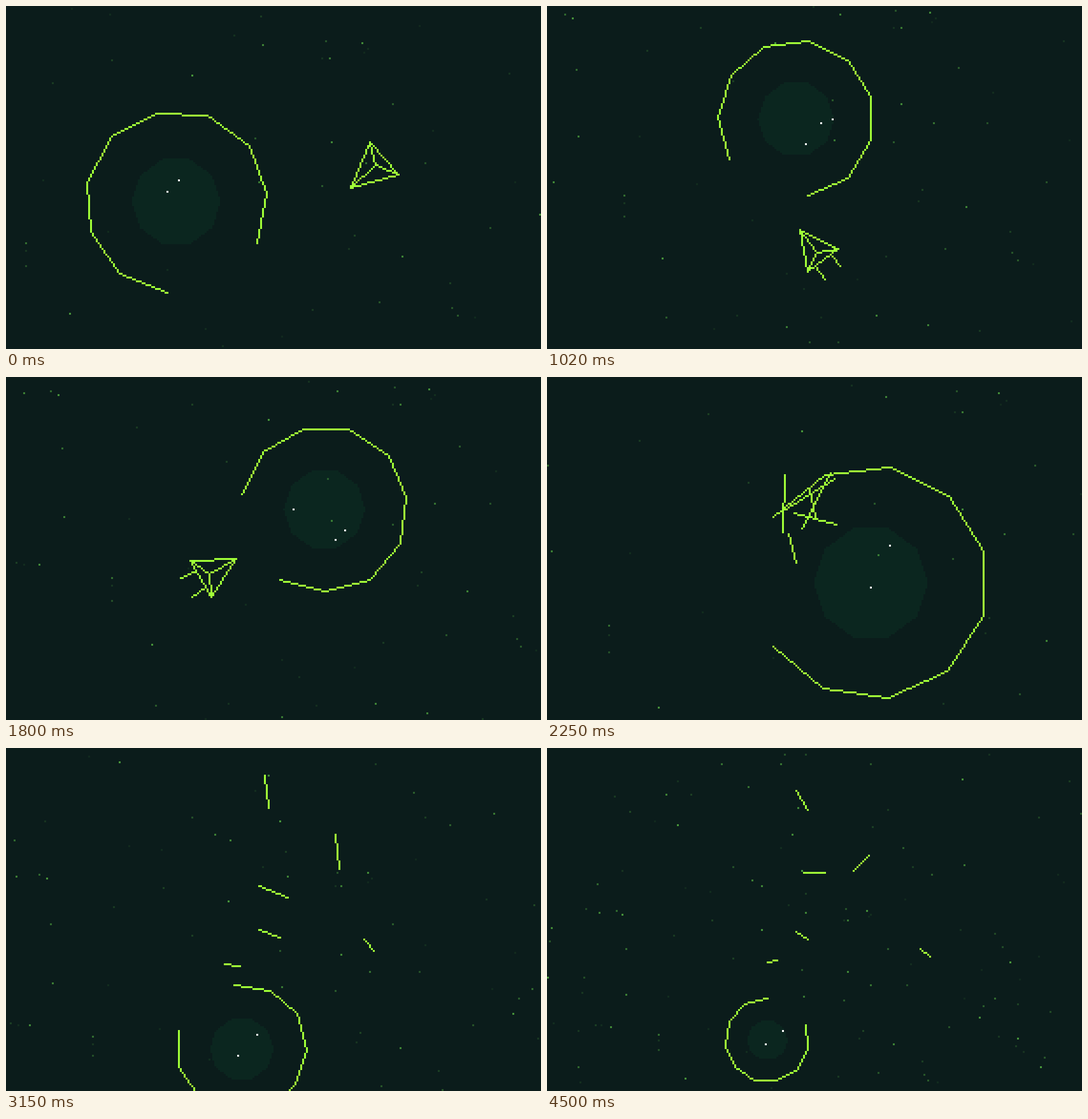
An HTML page with a canvas that plays this animation: 840x540 px, repeating every 4530 ms.

```html
<!DOCTYPE html>
<html lang="en">
<head>
<meta charset="utf-8">
<title>Gap orbit</title>
<style>
  html, body { margin: 0; width: 100%; height: 100%; overflow: hidden; background: #0b1c1b; }
  canvas { display: block; width: 840px; height: 540px; image-rendering: pixelated; }
</style>
</head>
<body>
<canvas id="view" width="280" height="180"></canvas>
<script>
const LOOP = 4530, STEP = 30, CRASH = 2190, PX = 3;
const W = 280, H = 180, RING = 2.045;
const COLOR = { sky: '#0b1c1b', planet: '#0b261f', line: '#a0ff37', star: 'rgb(92,190,70)' };
const ctx = document.getElementById('view').getContext('2d');
const rad = d => d * Math.PI / 180;

// Smooth curve through knots [time, ...values], uneven spacing allowed.
function spline(knots, t) {
  const last = knots.length - 1;
  let i = 0;
  while (i < last - 1 && t >= knots[i + 1][0]) i++;
  const a = knots[i], b = knots[i + 1], h = b[0] - a[0], s = (t - a[0]) / h;
  const slope = (j, c) => (knots[j + 1][c] - knots[j][c]) / (knots[j + 1][0] - knots[j][0]);
  const tangent = (j, c) => {
    if (j === 0) return slope(0, c);
    if (j === last) return slope(last - 1, c);
    const l = knots[j][0] - knots[j - 1][0], r = knots[j + 1][0] - knots[j][0];
    return (slope(j - 1, c) * r + slope(j, c) * l) / (l + r);
  };
  return a.slice(1).map((v, k) => {
    const c = k + 1, m0 = tangent(i, c) * h, m1 = tangent(i + 1, c) * h;
    if (s < 0) return v + m0 * s;
    const d = b[c] - v;
    return v + s * (m0 + s * (3 * d - 2 * m0 - m1 + s * (m0 + m1 - 2 * d)));
  });
}

// Planet radius in stage pixels; all world lengths are in planet radii.
const zoom = [[0, 70], [1020, 60], [1800, 64], [2250, 90], [3150, 50], [3810, 37.5], [4500, 32]];
// Time, orbit radius, orbit angle, heading.
const flight = [[0, 4.54, -10.3, 139], [1020, 3.55, 80.8, 232], [1800, 3.23, 150.3, 330], [CRASH, 1.7, 210.3, 333]];
// Where the middle of the scene sits on the stage.
const aimShip = [[0, 423.5, 279.6], [1020, 408, 283], [1800, 410.4, 259.2], [CRASH, 425, 266]];
const aimWreck = [[CRASH, 380, 240], [2250, 420.2, 228.1], [2450, 440, 243], [3150, 437, 268.2], [3810, 430.1, 265.5], [4500, 429.7, 267.8]];

// Drag slows the wreck, so its knots are spaced on a decaying clock.
const drag = t => 1 - Math.exp(-0.00095 * (t - CRASH));
const wreckTimes = [2250, 3150, 3810, 4500].map(drag);
const piece = (size, ...poses) => ({ size, path: poses.map((p, i) => [wreckTimes[i], ...p]) });
const wreck = [
  piece(1.06, [-1.08, -1.53, 147], [0.79, -8.1, 82], [1.3, -10.27, 66], [1.7, -11.8, 55]),
  piece(1.1, [-0.95, -1.43, 117], [3, -6.22, -96], [3.87, -7.79, -180], [4.6, -8.7, -224]),
  piece(1, [-1.51, -1.38, 92], [1, -4.95, 382], [1.5, -7, 482], [2.34, -8.25, 540]),
  piece(0.75, [-0.96, -1.11, 14], [0.88, -3.63, 381], [1.34, -4.4, 512], [1.7, -5.15, 572]),
  piece(0.52, [-1.01, -1.41, 80], [4, -3.27, 410], [6.35, -4.23, 530], [7.75, -4.27, 582]),
  piece(0.5, [-1.36, -0.6, 74], [-0.3, -2.64, 9], [0.03, -3.37, -4], [0.22, -3.87, -14])
];

const nose = [0.74, 0], left = [-0.25, -0.5], right = [-0.25, 0.5], hub = [0, 0];
const hull = [[nose, left], [nose, right], [left, right], [hub, nose], [hub, left], [hub, right]];
const flames = [-0.25, 0.25].map(y => [[-0.25, y], [-0.67, y]]);

function rng(seed) {
  return () => {
    seed = seed + 0x6d2b79f5 | 0;
    let n = Math.imul(seed ^ seed >>> 15, 1 | seed);
    n = n + Math.imul(n ^ n >>> 7, 61 | n) ^ n;
    return ((n ^ n >>> 14) >>> 0) / 4294967296;
  };
}

const FIELD = { w: 1440, h: 960 };
const rand = rng(41);
const stars = Array.from({ length: 137 }, () => ({
  x: rand() * FIELD.w, y: rand() * FIELD.h, glow: 0.08 + 0.7 * rand() ** 1.8
}));

const cell = v => Math.floor(v / PX);
const dot = (x, y) => ctx.fillRect(cell(x), cell(y), 1, 1);

function line([ax, ay], [bx, by]) {
  let x = cell(ax), y = cell(ay);
  const ex = cell(bx), ey = cell(by);
  const dx = Math.abs(ex - x), dy = -Math.abs(ey - y);
  const sx = x < ex ? 1 : -1, sy = y < ey ? 1 : -1;
  let err = dx + dy;
  for (;;) {
    ctx.fillRect(x, y, 1, 1);
    if (x === ex && y === ey) return;
    const e2 = 2 * err;
    if (e2 >= dy) { err += dy; x += sx; }
    if (e2 <= dx) { err += dx; y += sy; }
  }
}

function drawStars(center, unit) {
  const k = (unit / 70) ** 0.6;
  const wrap = (v, n) => ((v % n) + n) % n - n / 2;
  const shift = 35 / unit;
  ctx.fillStyle = COLOR.star;
  for (const s of stars) {
    ctx.globalAlpha = s.glow;
    dot(420 + wrap(s.x + (center[0] - 420) * shift, FIELD.w) * k,
        270 + wrap(s.y + (center[1] - 270) * shift, FIELD.h) * k);
  }
  ctx.globalAlpha = 1;
}

function drawPlanet([cx, cy], r) {
  const flat = r * Math.cos(rad(18));
  ctx.fillStyle = COLOR.planet;
  for (let row = cell(cy - flat); row <= cell(cy + flat); row++) {
    const y = Math.abs((row + 0.5) * PX - cy);
    if (y > flat) continue;
    const half = Math.min(...[18, 54].map(d => (flat - y * Math.sin(rad(d))) / Math.cos(rad(d))));
    const x0 = Math.round((cx - half) / PX), x1 = Math.round((cx + half) / PX);
    ctx.fillRect(x0, row, x1 - x0, 1);
  }
}

function drawSparks([cx, cy], unit, step) {
  const next = rng(step * 7919 + 5);
  ctx.fillStyle = '#fff';
  for (let n = Math.floor(next() * 4); n > 0; n--) {
    const a = next() * 2 * Math.PI, d = Math.sqrt(next()) * unit;
    dot(cx + d * Math.cos(a), cy + d * Math.sin(a));
  }
}

function drawRing([cx, cy], r, gap) {
  const points = Array.from({ length: 10 }, (_, i) => {
    const a = rad(gap + 33.6 + i * 32.53);
    return [cx + r * Math.cos(a), cy + r * Math.sin(a)];
  });
  for (let i = 0; i < 9; i++) line(points[i], points[i + 1]);
}

function render(t) {
  const [unit] = spline(zoom, t);
  const alive = t < CRASH;
  const segments = [];
  let middle;

  if (alive) {
    const [dist, angle, heading] = spline(flight, t);
    const x = dist * Math.cos(rad(angle)), y = dist * Math.sin(rad(angle));
    const c = Math.cos(rad(heading)), s = Math.sin(rad(heading));
    const place = ([px, py]) => [x + px * c - py * s, y + px * s + py * c];
    const parts = t > 240 ? hull.concat(flames) : hull;
    for (const part of parts) segments.push(part.map(place));
    middle = [x / 2, y / 2];
  } else {
    middle = [0, 0];
    for (const { size, path } of wreck) {
      const [x, y, turn] = spline(path, drag(t));
      const dx = Math.cos(rad(turn)) * size / 2, dy = Math.sin(rad(turn)) * size / 2;
      segments.push([[x - dx, y - dy], [x + dx, y + dy]]);
      middle[0] += x / 7;
      middle[1] += y / 7;
    }
  }

  const aim = spline(alive ? aimShip : aimWreck, t);
  const center = aim.map((v, i) => v - unit * middle[i]);
  const toStage = p => p.map((v, i) => center[i] + unit * v);
  const sec = t / 1000;

  ctx.fillStyle = COLOR.sky;
  ctx.fillRect(0, 0, W, H);
  drawPlanet(center, unit);
  drawStars(center, unit);
  drawSparks(center, unit, t / STEP);
  ctx.fillStyle = COLOR.line;
  drawRing(center, unit * RING, 61.5 + 51.9 * sec + 0.444 * sec * sec);
  for (const [a, b] of segments) line(toStage(a), toStage(b));
}

const start = performance.now();
function tick() {
  const t = (performance.now() - start) % LOOP;
  render(Math.floor(t / STEP) * STEP);
  requestAnimationFrame(tick);
}
tick();
</script>
</body>
</html>
```
